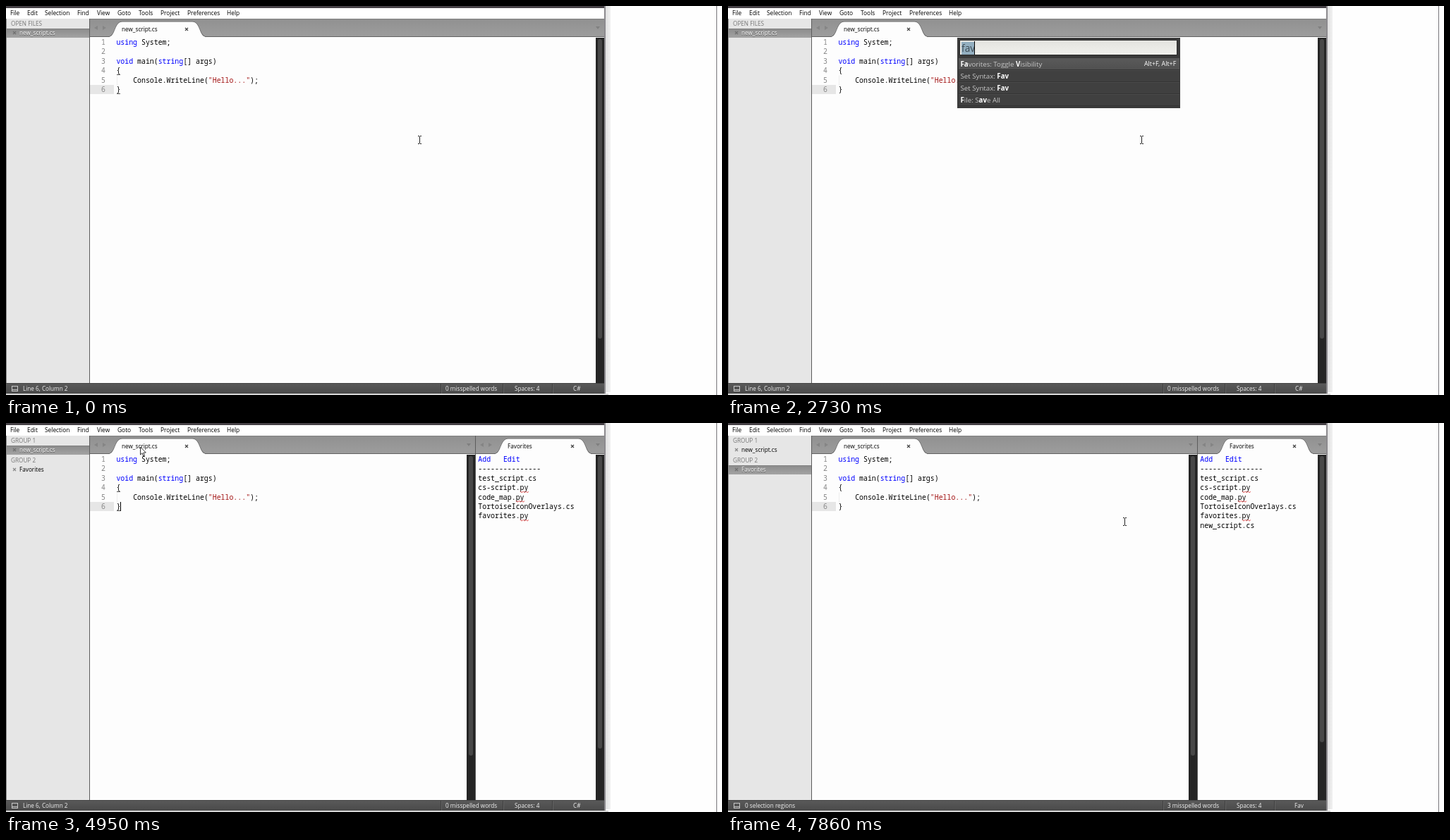
An HTML page with a canvas that plays this animation: 1015 by 552 pixels, repeating every 8 s.

```html
<!DOCTYPE html>
<html lang="en">
<head>
<meta charset="utf-8">
<title>Editor favorites</title>
<style>
html, body { margin: 0; width: 100%; height: 100%; overflow: hidden; background: #fff; }
canvas { display: block; }
</style>
</head>
<body>
<canvas id="stage" width="1015" height="552"></canvas>
<script>
const ctx = document.getElementById('stage').getContext('2d');
const LOOP = 8000;
const UI = '"Open Sans", "Noto Sans", sans-serif';
const MONO = '"Noto Sans Mono", "DejaVu Sans Mono", monospace';
const CHAR = 5.94, LINE = 13.4, BASE = 55;
const BLUE = '#0000ff', RED = '#a31515', BLACK = '#000';

// Pointer stops: time, x, y, shape
const POINTER = [
  [0, 586, 184, 'beam'], [4010, 582, 183, 'beam'], [4160, 452, 178, 'beam'],
  [4310, 430, 150, 'beam'], [4440, 412, 115, 'beam'], [4700, 300, 78, 'beam'],
  [4830, 206, 37, 'arrow'], [4950, 190, 34, 'arrow'], [5110, 188, 33, 'arrow'],
  [5390, 215, 33, 'arrow'], [5540, 400, 30, 'arrow'], [5660, 590, 54, 'beam'],
  [5780, 691, 72, 'beam'], [5930, 676, 56, 'beam'], [6080, 678, 49, 'beam'],
  [6760, 622, 54, 'beam'], [6900, 562, 112, 'beam'], [7030, 535, 148, 'beam'],
  [7170, 538, 147, 'beam'], [7860, 562, 134, 'beam']
];
const CARET = [
  [0, 0], [550, 1], [820, 0], [1190, 1], [1320, 0], [3030, 1], [3460, .5],
  [3610, 0], [4160, .5], [4310, 1], [5110, 0], [5540, .5], [5660, 1],
  [6080, .5], [6200, 0]
];
const POPUP_CARET = [[0, 1], [2050, .5], [2180, 0], [2730, 1]];
const MENU = [
  ['File', 6], ['Edit', 30], ['Selection', 55], ['Find', 101], ['View', 129],
  ['Goto', 158], ['Tools', 188], ['Project', 219], ['Preferences', 257], ['Help', 313]
];
const FILES = ['test_script.cs', 'cs-script.py', 'code_map.py',
  'TortoiseIconOverlays.cs', 'favorites.py', 'new_script.cs'];

const at = (steps, t) => steps.filter(s => s[0] <= t).pop();

function box(x, y, w, h, color) {
  ctx.fillStyle = color;
  ctx.fillRect(x, y, w, h);
}

function fade(x, y, w, h, from, to, across) {
  const g = across ? ctx.createLinearGradient(x, 0, x + w, 0)
                   : ctx.createLinearGradient(0, y, 0, y + h);
  g.addColorStop(0, from);
  g.addColorStop(1, to);
  box(x, y, w, h, g);
}

function text(str, x, y, color, size = 8.2, weight = 400, family = UI) {
  ctx.font = `${weight} ${size}px ${family}`;
  ctx.fillStyle = color;
  ctx.fillText(str, x, y);
  return x + ctx.measureText(str).width;
}

const code = (str, x, row, color = BLACK) =>
  text(str, x, BASE + row * LINE, color, 9.9, 400, MONO);

function poly(points, color) {
  ctx.beginPath();
  points.forEach(([x, y]) => ctx.lineTo(x, y));
  ctx.closePath();
  ctx.fillStyle = color;
  ctx.fill();
}

function cross(x, y, color) {
  ctx.beginPath();
  ctx.moveTo(x - 2, y - 2);
  ctx.lineTo(x + 2, y + 2);
  ctx.moveTo(x + 2, y - 2);
  ctx.lineTo(x - 2, y + 2);
  ctx.strokeStyle = color;
  ctx.lineWidth = 1.2;
  ctx.stroke();
}

function windowFrame() {
  box(0, 0, 1015, 552, '#fefefe');
  fade(850, 0, 7, 548, '#e0e0e0', '#f1f1f1', true);
  box(0, 550, 854, 2, '#d6d6d6');
  box(1007, 0, 1, 552, '#77757a');
  box(0, 0, 848, 3, '#464146');
  box(0, 3, 848, 15, '#fff');
  box(848, 0, 2, 550, '#8c8a8e');
}

function menu(showHelp) {
  MENU.forEach(([name, x]) => {
    if (showHelp || name !== 'Help') text(name, x, 13.4, BLACK, 8.4);
  });
}

function sideRow(name, y, active) {
  if (active) {
    fade(1, y, 117, 13, '#8b8b8b', '#a3a3a3');
    box(1, y, 117, 1, '#7f7f7f');
    text(name, 19, y + 10, '#555');
  }
  cross(12, y + 6, active ? '#707070' : '#888');
  text(name, 19, y + 9.3, active ? '#fff' : BLACK);
}

function sidebar(split, favFocus) {
  box(0, 18, 118, 517, '#e6e6e6');
  box(0, 18, 1, 532, '#8a8a8a');
  text(split ? 'GROUP 1' : 'OPEN FILES', 7, 28.2, '#777');
  sideRow('new_script.cs', 32, !favFocus);
  if (split) {
    text('GROUP 2', 7, 56.4, '#777');
    sideRow('Favorites', 60, favFocus);
  }
}

function tabBar(x, right, foot, width, title, titleX, closeX) {
  fade(x, 18, right - x, 25, '#909090', '#9d9d9d');
  box(x, 18, right - x, 1, '#808080');
  box(x, 43, right - x, 1, '#626262');
  poly([[x + 11, 28], [x + 11, 34], [x + 6, 31]], '#858585');
  poly([[x + 18, 28], [x + 18, 34], [x + 23, 31]], '#858585');
  poly([[right - 12, 29], [right - 6, 29], [right - 9, 33]], '#7f7f7f');

  const end = foot + width;
  ctx.beginPath();
  ctx.moveTo(foot, 43.5);
  ctx.bezierCurveTo(foot + 8, 42, foot + 7, 22.5, foot + 18, 22.5);
  ctx.lineTo(end - 18, 22.5);
  ctx.bezierCurveTo(end - 7, 22.5, end - 8, 42, end, 43.5);
  ctx.strokeStyle = '#616161';
  ctx.lineWidth = 1.3;
  ctx.stroke();
  ctx.lineTo(end, 45);
  ctx.lineTo(foot, 45);
  ctx.fillStyle = '#fdfdfd';
  ctx.fill();
  text(title, titleX, 36, BLACK);
  cross(closeX, 33, '#444');
}

function scrollBar(x, bottom) {
  box(x, 45, 12, 490, '#252525');
  ctx.beginPath();
  ctx.roundRect(x + 3, 47, 6, bottom - 47, 3);
  ctx.fillStyle = '#484848';
  ctx.fill();
}

function editor(brackets, caret) {
  box(119, 112, 34, 13, '#e6e6e6');
  ctx.textAlign = 'right';
  for (let i = 0; i < 6; i++) code(i + 1, 141, i, '#858585');
  ctx.textAlign = 'left';

  const x = 156.4, indent = x + 4 * CHAR;
  code(' System;', code('using', x, 0, BLUE), 0);
  let end = code(' main(', code('void', x, 2, BLUE), 2);
  code('[] args)', code('string', end, 2, BLUE), 2);
  code('{', x, 3);
  for (let y = 99; y < 112; y += 2) box(157, y, 1, 1, '#dedede');
  end = code('Console.WriteLine(', indent, 4);
  code(');', code('"Hello..."', end, 4, RED), 4);
  code('}', x, 5);
  if (brackets) {
    box(157, 97, 5, 1, '#555');
    box(157, 124, 5, 1, '#555');
  }
  ctx.globalAlpha = caret;
  box(162, 112, 1, 13, BLACK);
  ctx.globalAlpha = 1;
}

function squiggle(x, y) {
  ctx.beginPath();
  for (let i = 0; i <= 12; i++) ctx.lineTo(x + i, y + (i % 4 < 2 ? 0 : 1.4));
  ctx.strokeStyle = '#e04040';
  ctx.lineWidth = 0.9;
  ctx.stroke();
}

function favorites(count) {
  const x = 669.3;
  box(665, 44, 171, 491, '#fdfdfd');
  tabBar(666, 848, 694, 135, 'Favorites', 711, 803);
  box(665, 18, 1, 517, '#5c5c5c');
  code('Add', x, 0, BLUE);
  code('Edit', x + 6 * CHAR, 0, BLUE);
  code('-'.repeat(15), x, 1);
  FILES.slice(0, count).forEach((name, i) => {
    code(name, x, i + 2);
    if (name.endsWith('.py'))
      squiggle(x + (name.length - 2) * CHAR, BASE + (i + 2) * LINE + 2);
  });
}

function statusBar(left, words, syntax) {
  fade(0, 535, 848, 15, '#5a5a5a', '#4a4a4a');
  box(0, 535, 848, 1, '#434343');
  ctx.strokeStyle = '#c8c8c8';
  ctx.lineWidth = 1;
  ctx.strokeRect(8.5, 539.5, 8, 7);
  box(9, 544, 7, 1, '#c8c8c8');
  [616, 704, 774].forEach(x => {
    box(x, 536, 1, 14, '#404040');
    box(x + 1, 536, 1, 14, '#626262');
  });
  const ink = '#f0f0f0';
  text(left, 24, 546, ink);
  text(`${words} misspelled words`, 623, 546, ink);
  text('Spaces: 4', 721, 546, ink);
  text(syntax, syntax === 'C#' ? 804 : 803, 546, ink);
}

// Pieces between asterisks are the matched letters
function match(str, y) {
  let x = 329.5;
  str.split('*').forEach((part, i) => {
    x = text(part, x, y, i % 2 ? '#fff' : '#c6c6c6', 9.7, i % 2 ? 700 : 400);
  });
}

function popup(caret) {
  box(325, 45, 316, 100, '#3a3a3a');
  box(328, 48, 309, 22, '#2c2c2c');
  fade(329, 49, 307, 20, '#e3e3df', '#f0f0ec');
  box(331, 51, 19, 18, '#93afc0');
  text('fav', 331, 65, '#3d4a52', 13.7);
  ctx.globalAlpha = caret;
  box(349, 50, 1, 19, BLACK);
  ctx.globalAlpha = 1;

  fade(327, 74, 313, 17, '#5a5a5a', '#505050');
  ['*Fa*vorites: Toggle *V*isibility', 'Set Syntax: *Fav*', 'Set Syntax: *Fav*',
    '*F*ile: S*av*e All'].forEach((row, i) => {
    const y = 74 + i * 17;
    if (i) {
      box(327, y, 313, 17, '#404040');
      box(327, y, 313, 1, '#4a4a4a');
    }
    box(327, y + 16, 313, 1, '#343434');
    match(row, y + 12);
  });
  text('Alt+F, Alt+F', 590, 85.4, '#fff', 8.9);
}

function pointer(x, y, shape) {
  if (shape === 'beam') {
    box(x, y + 1, 1, 10, '#222');
    [y, y + 11].forEach(row => {
      box(x - 2, row, 2, 1, '#222');
      box(x + 1, row, 2, 1, '#222');
    });
    return;
  }
  const tip = [[0.5, 0], [0.5, 11], [3, 8.7], [4.8, 13], [6.5, 12.2], [4.8, 8.2], [8.3, 8]]
    .map(([dx, dy]) => [x + dx, y + dy]);
  poly(tip, '#fff');
  ctx.strokeStyle = BLACK;
  ctx.lineWidth = 0.8;
  ctx.stroke();
}

function draw(t) {
  const open = t >= 1620 && t < 3030;
  const split = t >= 3030;
  const favFocus = t >= 6480;
  const added = t >= 6600;
  const cleared = t >= 6760;

  windowFrame();
  menu(t < 3030 || t >= 3180);
  sidebar(split, favFocus);
  box(118, 44, 718, 491, '#fdfdfd');
  tabBar(119, split ? 665 : 848, 147, 135, 'new_script.cs', 164, 256);
  box(118, 18, 1, 517, '#5c5c5c');
  editor(!open && !favFocus, open ? 0 : at(CARET, t)[1]);
  if (split) {
    scrollBar(653, 472);
    favorites(added ? 6 : 5);
  }
  scrollBar(836, !split ? 472 : added ? 453 : 462);
  statusBar(cleared ? '0 selection regions' : favFocus ? 'Line 1, Column 2' : 'Line 6, Column 2',
    cleared ? 3 : 0, favFocus ? 'Fav' : 'C#');
  if (open) popup(at(POPUP_CARET, t)[1]);
  pointer(...at(POINTER, t).slice(1));
}

const start = performance.now();
function tick() {
  draw((performance.now() - start) % LOOP);
  requestAnimationFrame(tick);
}
tick();
</script>
</body>
</html>
```
